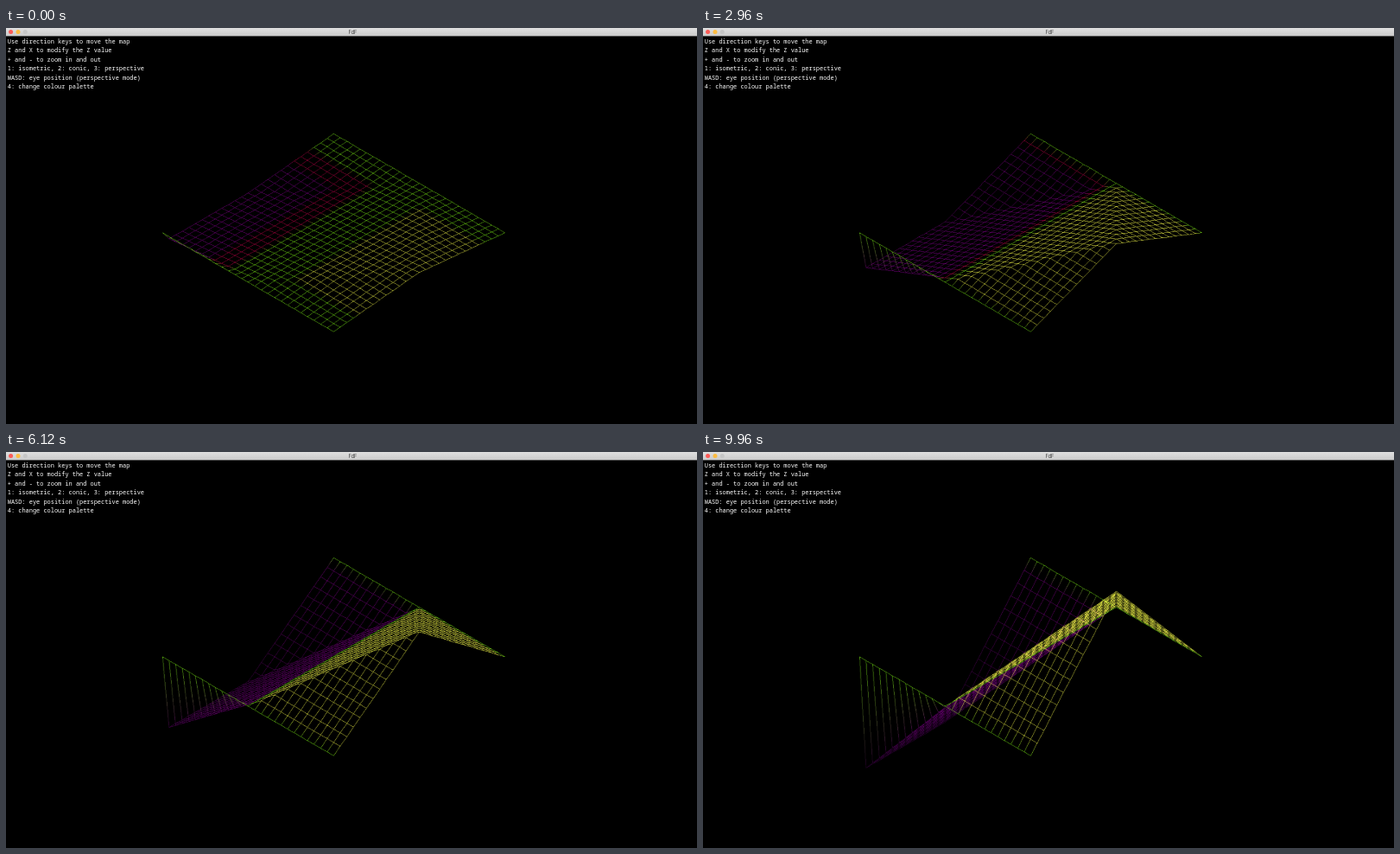
An HTML page with a canvas that plays this animation: 800 by 458 pixels, repeating every 10 s.

```html
<!DOCTYPE html>
<html lang="en">
<head>
<meta charset="utf-8">
<title>FdF</title>
<style>
  html, body { margin: 0; width: 100%; height: 100%; overflow: hidden; background: #000; }
  canvas, svg { position: absolute; left: 0; top: 0; display: block; }
  .help { font: 500 6.944px "Noto Sans Mono", monospace; fill: #fff; white-space: pre; }
  .title { font: 5.6px Inter, sans-serif; fill: #3c3c3c; text-anchor: middle; }
</style>
</head>
<body>
<canvas id="map" width="800" height="458"></canvas>
<svg width="800" height="458" viewBox="0 0 800 458">
  <defs>
    <linearGradient id="bar" x2="0" y2="1">
      <stop offset="0" stop-color="#e0e0e0"/>
      <stop offset="1" stop-color="#cacaca"/>
    </linearGradient>
  </defs>
  <rect width="800" height="9.4" fill="url(#bar)"/>
  <circle cx="5.6" cy="4.4" r="2.5" fill="#fc5b57"/>
  <circle cx="14" cy="4.4" r="2.5" fill="#fdbc40"/>
  <circle cx="22.3" cy="4.4" r="2.5" fill="#c6c6c6"/>
  <text class="title" x="401.5" y="6.6">FdF</text>
  <g class="help">
    <text x="1.8" y="18">Use direction keys to move the map</text>
    <text x="1.8" y="28.4">Z and X to modify the Z value</text>
    <text x="1.8" y="38.8">+ and - to zoom in and out</text>
    <text x="1.8" y="49.3">1: isometric, 2: conic, 3: perspective</text>
    <text x="1.8" y="59.7">WASD: eye position (perspective mode)</text>
    <text x="1.8" y="70.1">4: change colour palette</text>
  </g>
</svg>
<script>
const LOOP = 10000, TICK = 40;
const N = 26, MID = N / 2;
const LEFT = { x: 181.2, y: 236.6 }, DX = 198 / N, DY = 114.5 / N;
const GREEN = [125, 240, 20], YELLOW = [246, 250, 72], RED = [190, 0, 70];
const PURPLE = [132, 0, 142], DEEP = [52, 0, 60];

// The wireframe is plotted pixel by pixel in a larger window, then scaled down
const ZOOM = 2.4, BOX = { x: 175, y: 117, w: 408, h: 254 };
const ctx = document.getElementById('map').getContext('2d');
const buffer = document.createElement('canvas');
buffer.width = Math.round(BOX.w * ZOOM);
buffer.height = Math.round(BOX.h * ZOOM);
const bufferCtx = buffer.getContext('2d');
const image = bufferCtx.createImageData(buffer.width, buffer.height);
const pixels = new Uint32Array(image.data.buffer);

const mix = (a, b, t) => a.map((v, k) => v + (b[k] - v) * t);

// Height of a grid point, from -1 (pit) to 1 (peak)
function relief(i, j) {
  if (j === 0) return 0;
  const far = N - j;
  return i < MID ? -Math.min(MID - i, far) / MID
                 : Math.min(i - MID, j, far) / MID;
}

function colour(z) {
  if (z > 3) return YELLOW;
  if (z > -3) return GREEN;
  return z > -6 ? RED : mix(PURPLE, DEEP, Math.min(1, -z / 130));
}

// The Z key is held from 400 ms to 9720 ms
function zScale(ms) {
  const t = Math.floor(ms / TICK) * TICK;
  return 11.4 + 0.01305 * (Math.min(Math.max(t, 400), 9720) - 400);
}

function project(i, j, scale) {
  const z = relief(i, j) * scale;
  return {
    x: Math.round((LEFT.x + (i + j) * DX - BOX.x) * ZOOM),
    y: Math.round((LEFT.y + (i - j) * DY - z - BOX.y) * ZOOM),
    c: colour(z)
  };
}

function line(a, b) {
  const dx = b.x - a.x, dy = b.y - a.y;
  const steps = Math.max(Math.abs(dx), Math.abs(dy), 1);
  for (let s = 0; s <= steps; s++) {
    const t = s / steps;
    const x = Math.round(a.x + dx * t), y = Math.round(a.y + dy * t);
    const [r, g, bl] = mix(a.c, b.c, t);
    pixels[y * buffer.width + x] = 0xff000000 | bl << 16 | g << 8 | r;
  }
}

function draw(ms) {
  const scale = zScale(ms), pts = [];
  for (let i = 0; i <= N; i++) {
    pts.push([]);
    for (let j = 0; j <= N; j++) pts[i].push(project(i, j, scale));
  }
  pixels.fill(0xff000000);
  for (let i = 0; i <= N; i++) {
    for (let j = N; j >= 0; j--) {
      if (i < N) line(pts[i][j], pts[i + 1][j]);
      if (j > 0) line(pts[i][j], pts[i][j - 1]);
    }
  }
  bufferCtx.putImageData(image, 0, 0);
  ctx.fillStyle = '#000';
  ctx.fillRect(0, 0, 800, 458);
  ctx.imageSmoothingQuality = 'high';
  ctx.drawImage(buffer, BOX.x, BOX.y, buffer.width / ZOOM, buffer.height / ZOOM);
}

const start = performance.now();
function frame() {
  draw((performance.now() - start) % LOOP);
  requestAnimationFrame(frame);
}
frame();
</script>
</body>
</html>
```
